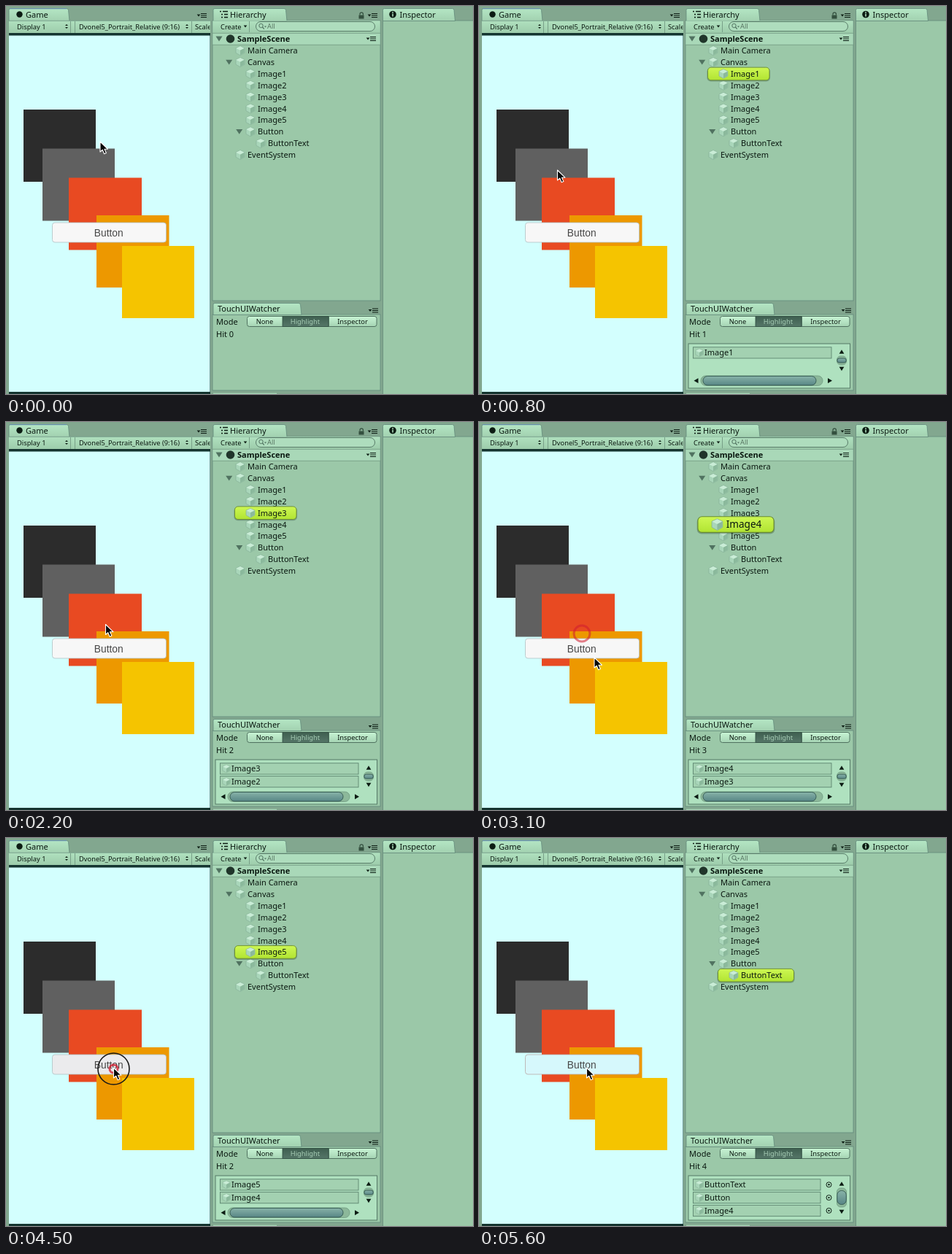
Animation, 640 px wide and 532 px high, one loop 5.7 s. Source, as an HTML page:

```html
<!DOCTYPE html>
<html lang="en">
<head>
<meta charset="utf-8">
<title>Hierarchy ping</title>
<style>
html, body { margin: 0; width: 100%; height: 100%; overflow: hidden; background: #82a78f; }
svg { display: block; width: 640px; height: 532px; }
text { font: 11px "Noto Sans", "Open Sans", sans-serif; fill: #0a1810; white-space: pre; }
.small { font-size: 9.3px; }
.bold { font-weight: 700; }
.ui { font: 13.8px "Liberation Sans", Arial, sans-serif; fill: #484848; }
</style>
</head>
<body>
<svg id="stage" viewBox="0 0 640 532"></svg>
<script>
const LOOP = 5700, STEP = 100;
const INK = '#0c1c13', PANEL = '#9bc8a8', EDGE = '#63897a', DIM = '#507260';

// Tree rows: label, indent level, has children
const TREE = [
  ['Main Camera', 0], ['Canvas', 0, true],
  ['Image1', 1], ['Image2', 1], ['Image3', 1], ['Image4', 1], ['Image5', 1],
  ['Button', 1, true], ['ButtonText', 2], ['EventSystem', 0]
];

// Each click: press time, moment the row pings, place, objects under the pointer
const CLICKS = [
  { down: 400, ping: 460, x: 107, y: 174, hits: ['Image1'] },
  { down: 1200, ping: 1259, x: 108, y: 221, hits: ['Image2', 'Image1'] },
  { down: 1800, ping: 1850, x: 131, y: 267, hits: ['Image3', 'Image2'] },
  { down: 2900, ping: 3069, x: 141, y: 290, hits: ['Image4', 'Image3', 'Image2'] },
  { down: 3800, ping: 3860, x: 180, y: 349, hits: ['Image5', 'Image4'] },
  { down: 4500, ping: 4660, x: 147.5, y: 316.5, hits: ['ButtonText', 'Button', 'Image4', 'Image3'] }
];

// Pointer: time, x, y
const PATH = [
  [0, 129, 186], [300, 107, 172], [500, 107, 172], [800, 107.5, 225],
  [1100, 108, 219], [1400, 108, 219], [1700, 131, 265], [1900, 131, 265],
  [2200, 136.5, 277.5], [2600, 141, 288], [2950, 141, 289], [3100, 158, 323],
  [3600, 180, 347], [3900, 180, 347], [4300, 147.5, 315], [5700, 147.5, 315]
];

const rect = (x, y, w, h, fill, more = '') =>
  `<rect x="${x}" y="${y}" width="${w}" height="${h}" fill="${fill}" ${more}/>`;
const path = (d, fill, more = '') => `<path d="${d}" fill="${fill}" ${more}/>`;
const line = (d, color, width = 1) => path(d, 'none', `stroke="${color}" stroke-width="${width}"`);
const circle = (x, y, r, fill, more = '') =>
  `<circle cx="${x}" cy="${y}" r="${r}" fill="${fill}" ${more}/>`;
const text = (x, y, s, cls = '', more = '') => `<text x="${x}" y="${y}" class="${cls}" ${more}>${s}</text>`;
const down = (x, y, w, h, fill = INK) => path(`M${x - w} ${y - h}h${2 * w}l${-w} ${2 * h}z`, fill);
const up = (x, y, w, h) => path(`M${x - w} ${y + h}h${2 * w}l${-w} ${-2 * h}z`, INK);
const side = (x, y, dir) => path(`M${x + 3 * dir} ${y}l${-6 * dir} -3.5v7z`, INK);
const gradient = (id, a, b) =>
  `<linearGradient id="${id}" x2="0" y2="1"><stop stop-color="${a}"/><stop offset="1" stop-color="${b}"/></linearGradient>`;

const cube = (x, y) =>
  path(`M${x} ${y - 6.3}l6 2.8v6.6l-6 3.4l-6 -3.4v-6.6z`, '#a9d6ba', 'stroke="#83ae95" stroke-width=".6"') +
  path(`M${x} ${y - 6}l5.7 2.7l-5.7 2.9l-5.7 -2.9z`, '#c9ecd6') +
  path(`M${x + 5.7} ${y - 3.3}v6.2l-5.7 3.2v-6.5z`, '#8bb99c');

const menu = (x, y) => down(x + 2, y, 2.3, 1.4) +
  line(`M${x + 5} ${y - 2.5}h8M${x + 5} ${y}h8M${x + 5} ${y + 2.5}h8`, INK, 1.1);
const tab = (x, y, w, h) =>
  path(`M${x} ${y + h}V${y + 2}q0 -2 2 -2H${x + w - 4}q2 0 2.5 2L${x + w} ${y + h}z`,
    'url(#tab)', `stroke="${EDGE}" stroke-width=".8"`);
const sorter = (x, y) => up(x, y - 2, 2, 1.1) + down(x, y + 2, 2, 1.1);

function gameView() {
  return tab(4, 3.5, 83, 17) + line('M5 3.7H83', '#6890b5') +
    circle(18.5, 11.5, 4.2, INK) + text(27, 15.5, 'Game') + menu(262, 13) +
    rect(4, 20, 276, 17, 'url(#bar)') + line('M4 20.3H280', EDGE, .7) +
    text(15, 31.6, 'Display 1', 'small') + sorter(83, 28) +
    text(100, 31.6, 'Dvonel5_Portrait_Relative (9:16)', 'small') + sorter(248, 28) +
    text(259, 31.6, 'Scale', 'small', 'clip-path="url(#gameClip)"') +
    line('M88.5 21V37M94.5 21V37M254.5 21V37', '#78a088') +
    rect(4, 37, 276, 495, '#153530') + rect(4, 40.5, 275.5, 488.5, '#d3fffe') +
    rect(24, 142, 99, 99, '#2c2c2c') + rect(50, 195.5, 99, 99, '#606060') +
    rect(86, 235.5, 100, 99, '#e84a22') + rect(124, 287, 99.5, 99, '#ed9800') +
    rect(159, 329, 99, 99, '#f5c400') +
    rect(63.5, 297, 156, 27, '#f7f7f7', 'id="button" rx="3.5" stroke="#b0c2c4" stroke-width=".8"') +
    text(120.8, 315.6, 'Button', 'ui');
}

const rowY = i => 61.2 + 15.87 * i;

function treeRow([label, level, open], i) {
  const x = 321 + 14 * level, y = rowY(i);
  return (open ? down(x - 15.3, y, 4.5, 3.4, DIM) : '') + cube(x, y) + text(x + 10, y + 4, label);
}

function hierarchy() {
  return rect(283, 20, 230, 384, PANEL, `stroke="${EDGE}" stroke-width=".8"`) + tab(284, 3.5, 101, 17) +
    line('M293 7.5h2M297 7.5h7M295 11.5h2M299 11.5h5M295 15.5h2M299 15.5h5', INK, 1.4) +
    text(307, 15.5, 'Hierarchy') +
    rect(483.5, 12.5, 7, 5, '#34503f') +
    line('M485 12.5v-1.5a2.2 2.2 0 0 1 4.4 0v1.5', '#34503f', 1.2) + menu(496, 13) +
    rect(283.4, 20.4, 229.2, 16.6, 'url(#bar)') + text(294, 31.6, 'Create', 'small') +
    down(328, 28, 2.3, 1.4) + line('M333.5 21V36', '#78a088') +
    rect(342.5, 21.5, 163, 13, '#aeddbd', `rx="6.5" stroke="${DIM}" stroke-width=".9"`) +
    circle(349.5, 27, 2.7, 'none', `stroke="${DIM}"`) + line('M351.5 29l2.3 2.6', DIM, 1.2) +
    down(355.5, 28.5, 1.6, 1, DIM) + text(358, 31.2, 'All', 'small', 'fill-opacity=".5"') +
    rect(283.4, 37, 229.2, 16, '#a9d8b8') + line('M283 37.3H513M283 53.3H513', '#78a088', .9) +
    down(292, 45, 4.5, 3.4, DIM) + circle(307.5, 45, 5.8, '#20352a') +
    text(317, 49, 'SampleScene', 'bold') + menu(494, 45) +
    TREE.map(treeRow).join('');
}

function watcher() {
  return rect(283, 423, 230, 104, PANEL, `stroke="${EDGE}" stroke-width=".8"`) + tab(284, 407.5, 121, 16) +
    text(290, 419, 'TouchUIWatcher') + menu(497, 417.5) +
    text(288, 436.5, 'Mode') +
    rect(330.5, 425.5, 177.5, 14, 'url(#key)', `rx="3" stroke="${DIM}"`) +
    rect(379, 425.5, 63, 14, 'url(#keyOn)', 'stroke="#2f4d40" stroke-width=".8"') +
    text(354.5, 436, 'None', 'small', 'text-anchor="middle"') +
    text(410, 436, 'Highlight', 'small', 'text-anchor="middle" style="fill:#a8cfb7"') +
    text(475, 436, 'Inspector', 'small', 'text-anchor="middle"') +
    line('M442.5 426V439', DIM) +
    '<text id="count" x="288" y="454"></text><g id="list"></g>' +
    line('M284 531.4H371', '#a9d8b8', 1.4);
}

function inspector() {
  return rect(516.5, 20, 125, 514, PANEL, `stroke="${EDGE}" stroke-width=".8"`) + tab(516.5, 3.5, 99, 17) +
    circle(530, 11.5, 4.8, INK) + line('M530 8v1.7M530 10.6v4', '#b5e2c3', 1.5) +
    text(539.5, 15.5, 'Inspector');
}

function hitList(hits) {
  if (!hits.length) return '';
  const long = hits.length > 3, w = long ? 174.5 : 189.5;
  const thumb = 'fill-opacity=".85" stroke="#31564f" stroke-width=".9"';
  const track = 'stroke="#6f9a80" stroke-width=".8"';
  const rows = hits.slice(0, long ? 3 : 2).map((name, i) => {
    const y = 467.8 + 17.8 * i;
    return rect(293.5, y, w, 15.2, '#a3d1b1', 'stroke="#5d8570" stroke-width=".9"') +
      `<g transform="translate(302 ${y + 7.6}) scale(.85)">${cube(0, 0)}</g>` + text(309, y + 11.6, name) +
      (long ? circle(479.5, y + 7.5, 3.5, 'none', `stroke="${INK}"`) + circle(479.5, y + 7.5, 1.2, INK) : '');
  }).join('');
  const across = long ? '' :
    rect(304, 507, 167, 13.5, '#8cb89a', 'rx="6.5" ' + track) +
    rect(307, 507.5, 155, 12.5, 'url(#thumb)', 'rx="6.2" ' + thumb) +
    side(297.5, 513.8, -1) + side(481, 513.8, 1);
  const upright = rect(490.5, 480, 13, long ? 26 : 12, '#8cb89a', 'rx="5" ' + track) +
    up(497, 474, 3.4, 2.7) + down(497, long ? 512.5 : 497.5, 3.4, 2.7) +
    (long ? rect(490.8, 483.5, 12.5, 19, 'url(#thumb)', 'rx="6" ' + thumb)
          : rect(490.8, 483, 12.5, 6, 'url(#thumb)', 'rx="3" ' + thumb));
  return rect(287, 463, 221.5, 61, '#afe1bf', 'stroke="#557a67"') + rows + across + upright;
}

// Highlight pops up to peak size and back within 200 ms
function pingBox(click, t) {
  if (!click) return '';
  const i = TREE.findIndex(row => row[0] === click.hits[0]);
  const [label, level] = TREE[i];
  const x = 321 + 14 * level, y = rowY(i), w = level > 1 ? 104 : 84.5;
  const rise = Math.max(0, 1 - Math.abs(100 - (t - click.ping)) / 100);
  const s = 1 + .75 * rise, cx = x - 21.5 + w * .69;
  return `<g transform="translate(${cx} ${y}) scale(${s}) translate(${-cx} ${-y})">` +
    rect(x - 22.5, y - 8, w + 2, 18.5, '#3c5a3c', 'rx="5" opacity=".4"') +
    rect(x - 21.5, y - 8.8, w, 17.6, 'url(#ping)', 'rx="4.5" stroke="#688a34" stroke-width=".9"') +
    cube(x, y) + text(x + 10, y + 4, label) + '</g>';
}

function rings(t) {
  const c = CLICKS.find(k => t >= k.down - 100 && t < k.down + 300);
  if (!c) return '';
  const age = t - c.down;
  const hold = age < 100 ? circle(c.x, c.y, 21.5, 'none', 'stroke="#181818" stroke-width="1.6"') : '';
  if (age < 0) return hold;
  const r = 5.5 + 5.5 * (1 - Math.exp(-age / 45));
  return hold + circle(c.x, c.y, r, 'none',
    `stroke="#d01c30" stroke-width="3" opacity="${.78 - age / 900}"`);
}

function pointer(t) {
  const i = PATH.findIndex((p, k) => k && t < p[0]);
  const [t0, x0, y0] = PATH[i - 1], [t1, x1, y1] = PATH[i];
  const u = (t - t0) / (t1 - t0), e = u * u * (3 - 2 * u);
  return `translate(${x0 + (x1 - x0) * e} ${y0 + (y1 - y0) * e})`;
}

const stage = document.getElementById('stage');
stage.innerHTML = '<defs>' +
  gradient('tab', '#b4e6c4', '#a2d1b0') + gradient('bar', '#b0e1bf', '#9dccab') +
  gradient('key', '#c8f5d5', '#a5d3b3') + gradient('keyOn', '#3f5f50', '#557668') +
  gradient('thumb', '#87b2ab', '#4f7d82') + gradient('ping', '#cdf753', '#b1e432') +
  '<clipPath id="gameClip"><path d="M256 20h23.5v18H256z"/></clipPath></defs>' +
  rect(0, 0, 640, 532, '#82a78f') + gameView() + hierarchy() + watcher() + inspector() +
  '<g id="ping-box"></g><g id="rings"></g><g id="pointer">' +
  path('M0 0V14L3.3 11.2L5.6 16.8L8.4 15.6L6 10.2H10.4Z', '#080808',
    'stroke="#fff" stroke-width="1.1" stroke-linejoin="round"') + '</g>';

const part = id => document.getElementById(id);
const [button, count, list, pingLayer, ringLayer, arrow] =
  ['button', 'count', 'list', 'ping-box', 'rings', 'pointer'].map(part);

function draw(t) {
  const click = CLICKS.filter(c => t >= c.ping).pop();
  const hits = click ? click.hits : [];
  count.textContent = 'Hit ' + hits.length;
  list.innerHTML = hitList(hits);
  pingLayer.innerHTML = pingBox(click, t);
  ringLayer.innerHTML = rings(t);
  arrow.setAttribute('transform', pointer(t));
  const pressed = t >= 4400 && t < 4700, chosen = t >= 4700;
  button.setAttribute('fill', pressed ? '#ebebed' : chosen ? '#d6f8fc' : '#f7f7f7');
  button.setAttribute('stroke', chosen ? '#b9aaa8' : '#b0c2c4');
}

const start = performance.now();
let shown = -1;
function tick() {
  const t = Math.floor(((performance.now() - start) % LOOP) / STEP) * STEP;
  if (t !== shown) draw(shown = t);
  requestAnimationFrame(tick);
}
draw(0);
tick();
</script>
</body>
</html>
```
